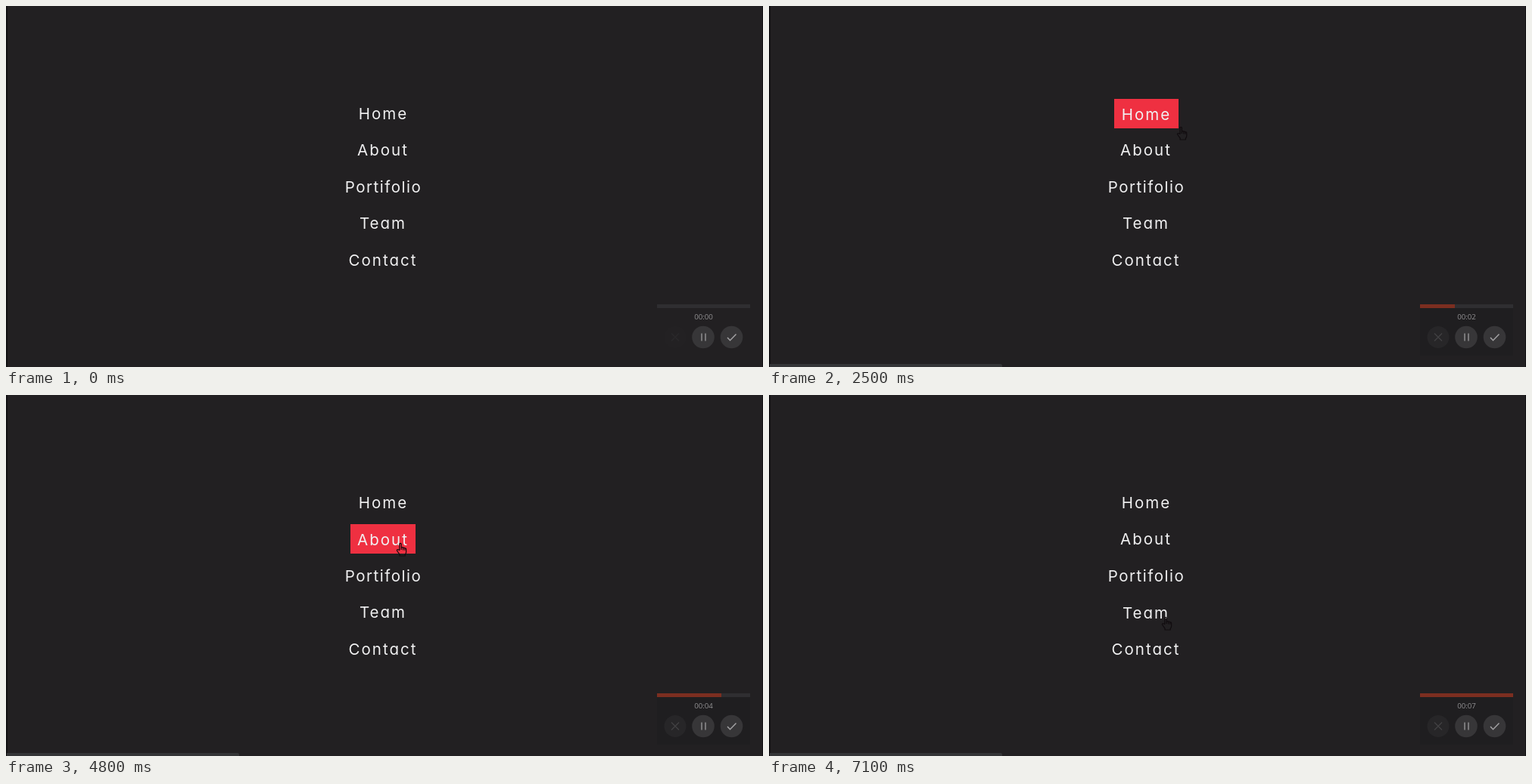
Animation of 1000x478 px, one loop 7.2 s. Source, as an HTML page:

```html
<!DOCTYPE html>
<html lang="en">
<head>
<meta charset="utf-8">
<title>Menu hover</title>
<style>
  html, body { margin: 0; width: 100%; height: 100%; overflow: hidden; background: #222022; }
  #stage { position: relative; width: 1000px; height: 478px; overflow: hidden; background: #222022; }
  #stage::before, #stage::after { content: ""; position: absolute; top: 0; bottom: 0; background: #121113; }
  #stage::before { left: 0; width: 1.5px; }
  #stage::after { right: 0; width: 1px; }
  .item { position: absolute; height: 39px; overflow: hidden; text-align: center;
    font: 400 20.5px/39px Inter, "Open Sans", sans-serif; font-feature-settings: "cv11"; color: #f1f1f2; }
  .item i { position: absolute; inset: 0; background: #ef3041; transform: scaleX(0); }
  .item span { position: relative; display: block; white-space: nowrap; }
  .item span::before { content: attr(data-text); position: absolute; left: 0; right: 0; top: -29px; }
  #status { position: absolute; left: 1px; top: 474px; width: 307px; height: 4px; background: #343537; border-radius: 0 2px 0 0; }
  #panel { position: absolute; left: 860px; top: 400px; width: 123px; height: 63px; background: #1f1e20; }
  #track { position: absolute; left: 860px; top: 395px; width: 123px; height: 5px; background: #2f2e31; }
  #fill { height: 5px; background: #7c2e20; }
  #clock { position: absolute; left: 860px; top: 405px; width: 123px; text-align: center;
    font: 9.7px/14px "Open Sans", "Noto Sans", sans-serif; color: #929193; }
  svg { position: absolute; left: 0; top: 0; }
</style>
</head>
<body>
<div id="stage">
  <div id="panel"></div>
  <div id="track"><div id="fill"></div></div>
  <div id="clock">00:00</div>
  <div id="status"></div>
  <svg width="1000" height="478" fill="none">
    <g id="close">
      <circle cx="884" cy="438.5" r="14.5" fill="#272628"/>
      <path d="M879 433.5l10 10m0-10l-10 10" stroke="#424143" stroke-width="1.3"/>
    </g>
    <circle cx="921" cy="438.5" r="14.8" fill="#373638"/>
    <path d="M919 433.5v10m5-10v10" stroke="#959496" stroke-width="1.4"/>
    <circle cx="958.5" cy="438.5" r="14.8" fill="#373638"/>
    <path d="M953 439l3.5 3.7 8-8.2" stroke="#a5a4a6" stroke-width="1.4"/>
  </svg>
  <div id="menu"></div>
  <svg width="1000" height="478" fill="none">
    <g id="arrow"><path d="M0 0v12l2.7-2.5 2 4.6 2.1-.9-2-4.5h3.6z" fill="#070708"/></g>
    <g id="hand" stroke="#110c0f" stroke-width="1.2" stroke-linejoin="round">
      <path d="M-1.2 9.5V1.2q1.2-1.6 2.4 0V6q1.4-1 2.4.4 1.4-.8 2.2.6 1.8-.4 1.8 1.2V12q0 2-1.4 3.2V17H-1v-1.8L-4.6 10q0-1.8 1.6-1.2zM1.2 6v3M3.6 6.4v3M5.8 7v2.8"/>
    </g>
  </svg>
</div>
<script>
const LOOP = 7200, STEP = 100, D = 400, SHIFT = 29.5;
const $ = id => document.getElementById(id);

// label, box width, letter spacing, pointer enter and leave times
const ITEMS = [
  ["Home", 85, 2, 1262, 2530],
  ["About", 86, 2, 3656, 5108],
  ["Portifolio", 121, 1.5, 5250, 6695],
  ["Team", 82, 2, 7076, 9000],
  ["Contact", 112, 2, 9000, 9900]
];
// time, x, y of the pointer tip
const PATH = [
  [100, 992, 470], [700, 740, 330], [1050, 590, 215], [1262, 540, 161], [1700, 536, 152],
  [2400, 538, 150], [2530, 546, 163], [2850, 567, 176], [3200, 574, 179], [3400, 569, 183],
  [3656, 541, 190], [4200, 521, 193], [5000, 521, 197], [5108, 520, 210], [5250, 519, 221],
  [5300, 519, 246], [6100, 518, 243], [6550, 518, 248], [6695, 519, 259], [7000, 522, 266],
  [7076, 523, 284], [7100, 524, 294]
];
const STATUS = [[1350, 2830], [3740, LOOP]];

const clamp = v => Math.max(0, Math.min(1, v));
const within = (t, a, b) => t >= a && t < b;

// cubic-bezier(.25, .1, .25, 1)
function ease(x) {
  x = clamp(x);
  if (x === 0 || x === 1) return x;
  const curve = (a, b, s) => 3 * a * s * (1 - s) ** 2 + 3 * b * s * s * (1 - s) + s ** 3;
  let lo = 0, hi = 1;
  for (let i = 0; i < 24; i++) {
    const mid = (lo + hi) / 2;
    if (curve(.25, .25, mid) < x) lo = mid; else hi = mid;
  }
  return curve(.1, 1, lo);
}

const rows = ITEMS.map(([label, width, spacing, enter, leave], i) => {
  const box = document.createElement("div");
  const bar = document.createElement("i");
  const text = document.createElement("span");
  const left = Math.round(498.3 - width / 2), top = Math.round(122.8 + 48.5 * i);
  box.className = "item";
  box.style.cssText = `left:${left}px;top:${top}px;width:${width}px;letter-spacing:${spacing}px`;
  text.textContent = text.dataset.text = label;
  box.append(bar, text);
  $("menu").append(box);
  return { bar, text, enter, leave };
});

function drawRow({ bar, text, enter, leave }, t) {
  const out = t >= leave;
  const slide = out ? 1 - ease((t - leave - D) / D) : ease((t - enter) / D);
  const grow = out ? 1 - ease((t - leave) / D) : ease((t - enter - D) / D);
  text.style.transform = `translateY(${slide * SHIFT}px)`;
  bar.style.transformOrigin = out ? "left" : "right";
  bar.style.transform = `scaleX(${grow})`;
}

function pointer(t) {
  const i = PATH.findIndex(p => p[0] >= t);
  if (i < 1) return PATH[i < 0 ? PATH.length - 1 : 0].slice(1);
  const [t0, x0, y0] = PATH[i - 1], [t1, x1, y1] = PATH[i];
  const k = (t - t0) / (t1 - t0);
  return [x0 + (x1 - x0) * k, y0 + (y1 - y0) * k];
}

function draw(t) {
  rows.forEach(row => drawRow(row, t));

  const [x, y] = pointer(t);
  const over = rows.some(r => within(t, r.enter, r.leave));
  for (const id of ["arrow", "hand"]) {
    $(id).setAttribute("transform", `translate(${x} ${y})`);
    $(id).style.display = t >= 100 && (id === "hand") === over ? "" : "none";
  }

  $("status").style.opacity = STATUS.some(([a, b]) => within(t, a, b)) ? 1 : 0;
  $("fill").style.width = (t ? Math.min(123, 3 + t * .0171) : 0) + "px";
  $("clock").textContent = "00:0" + Math.floor(t / 1000);
  $("panel").style.opacity = clamp(t / 300);
  $("close").style.opacity = .25 + .75 * clamp(t / 300);
}

const start = performance.now();
function tick() {
  const t = (performance.now() - start) % LOOP;
  draw(Math.floor(t / STEP) * STEP);
  requestAnimationFrame(tick);
}
tick();
</script>
</body>
</html>
```
